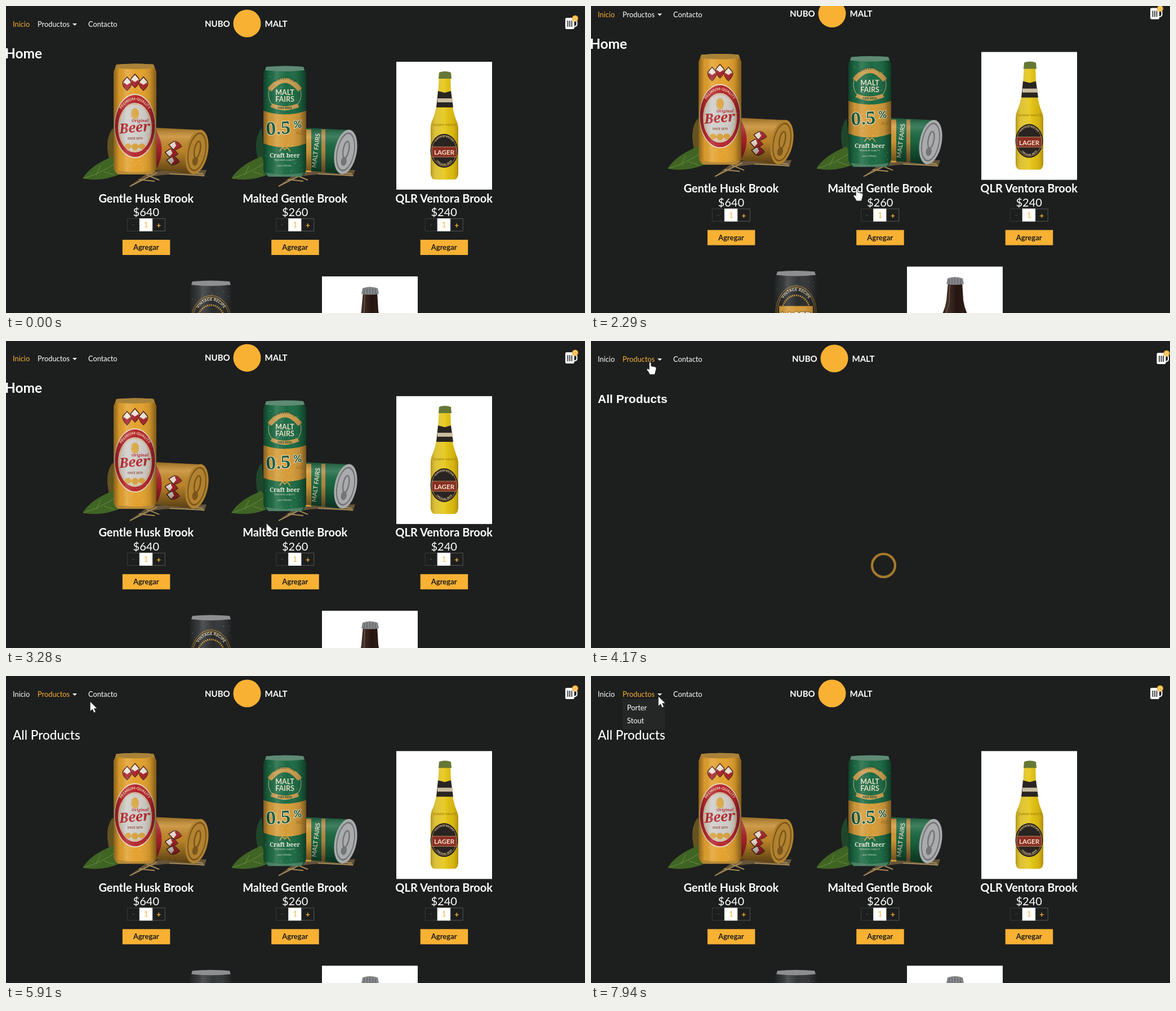
An HTML page that plays this animation: 1028 by 545 pixels, repeating every 8 s.

```html
<!DOCTYPE html>
<html lang="es">
<head>
<meta charset="utf-8">
<title>Tienda</title>
<style>
html, body { margin: 0; width: 100%; height: 100%; overflow: hidden; background: #1d1e1e; }
svg { position: absolute; left: 0; top: 0; }
text { font-family: Lato, sans-serif; fill: #fff; white-space: pre; }
#loader { position: absolute; left: 497px; top: 376px; width: 45px; height: 45px; perspective: 640px; }
#loader div { position: absolute; inset: 0; box-sizing: border-box; border: 4.5px solid #f8b133; border-radius: 50%; opacity: .4; }
</style>
</head>
<body>
<svg id="stage" width="1028" height="545"></svg>
<div id="loader"><div></div><div></div></div>
<svg id="overlay" width="1028" height="545"></svg>
<script>
const AMBER = '#f8b133', GOLD = '#d6a03c', CREAM = '#e9dfc4', SERIF = "font-family:'Noto Serif',serif";
const $ = id => document.getElementById(id);
let arcCount = 0;

const text = (x, y, size, str, extra = '') => `<text x="${x}" y="${y}" font-size="${size}" ${extra}>${str}</text>`;
const mid = (x, y, size, str, extra = '') => text(x, y, size, str, 'text-anchor="middle" ' + extra);
const style = (fill, weight = 700, css = '') => `style="fill:${fill};${css}" font-weight="${weight}"`;
const rect = (x, y, w, h, fill, extra = '') => `<rect x="${x}" y="${y}" width="${w}" height="${h}" fill="${fill}" ${extra}/>`;
const oval = (x, y, rx, ry, fill, extra = '') => `<ellipse cx="${x}" cy="${y}" rx="${rx}" ry="${ry}" fill="${fill}" ${extra}/>`;
const path = (d, fill, extra = '') => `<path d="${d}" fill="${fill}" ${extra}/>`;
const group = (x, y, inner, extra = '') => `<g transform="translate(${x} ${y}) ${extra}">${inner}</g>`;

// Text along the upper (sweep 1) or lower (sweep 0) half of an ellipse
function arcText(x, y, rx, ry, size, str, fill, sweep = 1) {
  const id = 'arc' + arcCount++;
  return path(`M${x - rx} ${y}A${rx} ${ry} 0 0 ${sweep} ${x + rx} ${y}`, 'none', `id="${id}"`) +
    `<text font-size="${size}" text-anchor="middle" ${style(fill)}><textPath href="#${id}" startOffset="50%">${str}</textPath></text>`;
}

function droplets(seed) {
  let out = '';
  for (let i = 0; i < 45; i++) {
    seed = seed * 16807 % 2147483647;
    const x = 4 + seed % 69, y = 14 + (seed >> 8) % 175;
    out += oval(x, y, .5, .9, '#fff', 'opacity=".45"');
  }
  return out;
}

const canShape = 'M5 1Q38-2 71 1L76 14V184Q74 193 67 196H9Q2 193 0 184V14Z';
const can = (color, rim, label, seed) =>
  path(canShape, color) + label + droplets(seed) + path(canShape, 'url(#shade)') +
  path('M5 1Q38-2 71 1L73 7Q38 11 3 7Z', rim) +
  path('M4 189Q38 195 72 189L67 196H9Z', rim, 'opacity=".7"');

const scenery = (color, end, tab, sticker) =>
  path('M190 217Q174 236 184 275L196 285Z', color) + path('M190 217Q174 236 184 275L196 285Z', '#23301899') +
  path('M136 306Q151 282 190 267L204 298Q170 313 136 306Z', '#3f6424') +
  path('M138 306Q170 296 196 278M160 300L168 283M174 294L192 300', 'none', 'stroke="#6b8d3e" stroke-width="1"') +
  path('M218 321L256 293 335 292 356 291 352 303Q300 294 252 304Z', '#65543a') +
  path('M220 320L268 296M236 308l28 3M250 300l22 9M290 298l62 3M310 293l40 5', 'none', 'stroke="#a58a58" stroke-width="2"') +
  path('M262 216L342 220Q362 232 358 260 352 292 330 298L262 291Z', color) +
  sticker +
  path('M262 216L342 220Q362 232 358 260 352 292 330 298L262 291Z', 'url(#shadeDown)') +
  group(339, 259, oval(0, 0, 19.5, 40, end) + oval(0, 0, 16, 35, tab) + oval(0, 0, 14, 32, end) +
    oval(0, -4, 5, 15, 'none', `stroke="${tab}" stroke-width="2.5"`) + oval(0, 17, 5, 8, tab), 'rotate(11)');

const berry = (x, y) =>
  path(`M${x} ${y + 14}Q${x - 10} ${y + 5} ${x - 7} ${y - 2}L${x} ${y - 10} ${x + 7} ${y - 2}Q${x + 10} ${y + 5} ${x} ${y + 14}Z`, '#eee3d5', 'stroke="#4a1b12" stroke-width="1.5"') +
  path(`M${x} ${y + 13}Q${x - 9} ${y + 6} ${x - 6} ${y}L${x} ${y + 4} ${x + 6} ${y}Q${x + 9} ${y + 6} ${x} ${y + 13}Z`, '#a8232a');
const berries = berry(24, 33) + berry(53, 33) + berry(38, 28);

const goldLabel = berries +
  oval(38, 110, 37, 57, '#e9d9c0') + oval(38, 110, 35.5, 55, '#b3262b') +
  oval(38, 113, 30, 44, '#cfccc8') + oval(38, 113, 28, 42, 'none', 'stroke="#d9a94a"') +
  arcText(38, 105, 30, 41, 6.5, 'PREMIUM·QUALITY', '#f5dfb5') +
  oval(38, 88, 7, 10, '#d9a94a') +
  mid(47, 103, 7, 'Original', style('#b3262b', 700, SERIF + ';font-style:italic')) +
  mid(38, 121, 24, 'Beer', style('#b3262b', 700, SERIF + ';font-style:italic') + ' transform="rotate(-5 38 119)"') +
  mid(38, 134, 5, 'SINCE 1870', style('#8b3b2c')) +
  oval(26, 146, 6, 5, GOLD) + oval(38, 147, 6, 6, GOLD) + oval(50, 146, 6, 5, GOLD);

const greenLabel =
  oval(38, 50, 29, 28, 'none', 'stroke="#cfc49d"') +
  path('M11 42Q38 8 65 42', 'none', 'stroke="#c99c4d" stroke-width="9"') +
  arcText(38, 44, 25, 21, 5.5, 'HARVESTTIME', '#17472f') +
  mid(38, 51, 12.5, 'MALT', style(CREAM)) + mid(38, 63, 12.5, 'FAIRS', style(CREAM)) +
  path('M14 69Q38 80 62 69', 'none', 'stroke="#c99c4d" stroke-width="7"') +
  mid(38, 76, 5, 'FREE BEER', style('#17472f')) +
  path('M0 79Q38 92 76 79V137Q38 151 0 137Z', '#d49b38') +
  `<g transform="rotate(-4 38 115)" stroke="#f4ead0" stroke-width="2" paint-order="stroke">` +
  text(5, 120, 31, '0.5', style('#17583a', 700, SERIF)) + text(54, 111, 18, '%', style('#17583a')) + '</g>' +
  text(58, 121, 8, 'ALC', style('#a97720', 400)) +
  path('M29 151q4-10 9-3 5-7 9 3', 'none', 'stroke="#c99c4d" stroke-width="2"') +
  mid(38, 162, 10.5, 'Craft beer', style('#f2eee0', 700, SERIF)) +
  mid(38, 168, 4, 'PREMIUM QUALITY', style('#d5d7bd', 400)) + mid(38, 178, 4, 'ALE STRONG', style('#d5d7bd', 400));

const darkLabel =
  oval(38, 73, 36, 47, 'none', 'stroke="#c08d35"') + oval(38, 73, 33, 44, '#292b2b', 'stroke="#c08d35"') +
  arcText(38, 70, 28, 35, 7, 'VINTAGE RECIPE', CREAM) +
  oval(38, 73, 25, 30, 'none', 'stroke="#c08d35" stroke-width="3" stroke-dasharray="2 1.5"') +
  rect(8, 62, 60, 29, '#d49a36') +
  mid(38, 84, 17, 'LAGER', style('#f4e6c5', 700, 'stroke:#5b4425;stroke-width:1.5;paint-order:stroke')) +
  arcText(38, 77, 32, 39, 6.5, 'ORIGINAL BEER', CREAM, 0);

const goldShot = scenery('#c58a2b', '#b1822f', '#7b551b',
  group(268, 294, berries, 'rotate(-82) scale(.95) translate(0 -8)') + path('M267 222Q286 255 267 289Z', '#a8232a')) +
  group(191, 103, can('#e3a12d', '#a98238', goldLabel, 71));
const greenShot = scenery('#1c6a43', '#a9abac', '#737678',
  rect(268, 219, 10, 76, '#d49b38') + rect(296, 219, 7, 76, '#b78b43') +
  mid(0, 0, 11, 'MALT FAIRS', style(CREAM) + ' transform="translate(290 257) rotate(-83)"')) +
  group(193, 107, can('#1c6a43', '#5f8a74', greenLabel, 907));
const darkShot = scenery('#363839', '#9a9b9b', '#646566', rect(280, 219, 16, 76, '#c08d35')) +
  group(193, 107, can('#343738', '#8d8f90', darkLabel, 3301));

const lagerBottle = rect(693, 99, 170, 227, '#fff') +
  path('M769 124L767 155Q765 185 756 205 754 210 754 220V298Q755 308 762 308H795Q802 308 803 298V220Q803 210 800 205 792 185 790 155L789 124Z', '#dcbc16') +
  path('M769 124L767 155Q765 185 756 205 754 210 754 220V298Q755 308 762 308H795Q802 308 803 298V220Q803 210 800 205 792 185 790 155L789 124Z', 'url(#glass)') +
  path('M769 118Q779 114 790 118L791 129H768Z', '#667735') +
  path('M767 151L779 154 790 151 794 180H764Z', '#292522') + rect(766, 164, 27, 7, '#c9bda0') +
  mid(779, 213, 6, 'SUNNY MALTS', style('#a58608', 700)) +
  oval(778, 257, 24.5, 30, '#292421') + oval(778, 257, 22, 27, 'none', 'stroke="#b08a48"') +
  arcText(778, 255, 19, 22, 4.5, 'VINTAGE RECIPE', '#d8c49c') +
  rect(756, 250, 44, 18, '#8a2f25', 'stroke="#c39b61" stroke-width=".8"') +
  mid(778, 264, 11.5, 'LAGER', style('#f1e3c6')) +
  arcText(778, 260, 19, 23, 4.5, 'ORIGINAL BEER', '#d8c49c', 0);

const brownBottle = rect(561, 480, 170, 227, '#fff') +
  path('M634 507L631 540Q628 562 614 580 609 587 609 600V690H683V600Q683 587 678 580 664 562 661 540L659 507Z', '#25130e') +
  path('M634 507L631 540Q628 562 614 580 609 587 609 600V690H683V600Q683 587 678 580 664 562 661 540L659 507Z', 'url(#shade)') +
  path('M637 512L636 545Q630 568 618 586V640', 'none', 'stroke="#71503f" stroke-width="1.5"') +
  path('M633 501Q646 496 660 501L662 511Q646 514 631 511Z', '#85878a') +
  path('M636 502v9M641 501v10M646 501v10M651 501v10M656 502v9', 'none', 'stroke="#55575a"') +
  oval(646, 623, 29, 29, '#d3ae55') + oval(646, 623, 26, 26, '#35302a') + oval(646, 623, 18, 18, '#d9d0b8') +
  arcText(646, 623, 19.5, 19.5, 5, 'CRAFT BEER', CREAM);

const card = (x, name, price) =>
  mid(x, 348.5, 20, name, 'font-weight="700"') + mid(x, 373, 20, price) +
  rect(x - 33.5, 377.5, 23, 22, 'none', 'stroke="#3a3b3b"') + mid(x - 23, 393, 12.8, '-', style('#505151', 400)) +
  rect(x - 12, 377, 23.5, 23, '#fff') + mid(x, 393, 12.8, '1', style(AMBER, 400)) +
  rect(x + 11.5, 377.5, 22, 22, 'none', 'stroke="#555656"') + mid(x + 22.5, 394, 14, '+', style(AMBER)) +
  rect(x - 42, 415, 84.5, 27, AMBER) + mid(x, 433, 13, 'Agregar', style('#1a1a1a'));

const gradient = (id, dir, stops) => `<linearGradient id="${id}" x2="${dir ? 0 : 1}" y2="${dir}">` +
  stops.map(([at, color, alpha]) => `<stop offset="${at}" stop-color="${color}" stop-opacity="${alpha}"/>`).join('') + '</linearGradient>';

$('stage').innerHTML = '<defs>' +
  gradient('shade', 0, [[0, '#000', .4], [.14, '#000', .05], [.3, '#fff', .14], [.55, '#fff', 0], [.85, '#000', .12], [1, '#000', .45]]) +
  gradient('shadeDown', 1, [[0, '#000', .25], [.2, '#fff', .15], [.5, '#000', .05], [1, '#000', .55]]) +
  gradient('glass', 0, [[0, '#8b6a00', .5], [.25, '#fff', .12], [.5, '#ffe93c', .35], [.8, '#c79e00', .2], [1, '#7d5e00', .5]]) +
  '</defs><g id="page"><g id="products">' +
  goldShot + group(264, 0, greenShot) + lagerBottle + group(133, 381, darkShot) + brownBottle +
  card(248.8, 'Gentle Husk Brook', '$640') + card(513.2, 'Malted Gentle Brook', '$260') + card(777.7, 'QLR Ventora Brook', '$240') +
  '</g><g id="home">' + text(-2, 93, 24.5, 'Home', 'font-weight="700"') + '</g>' +
  text(12, 110, 21, 'All Products', `id="rawTitle" font-weight="700" style="font-family:'Liberation Sans',sans-serif"`) +
  text(12, 112.5, 22.5, 'All Products', 'id="title" font-weight="500"') +
  text(12, 37, 12.8, 'Inicio', 'id="navHome"') + text(56, 37, 12.8, 'Productos', 'id="navProducts"') +
  path('M118 31H126L122 35Z', '#fff') + text(146, 37, 12.8, 'Contacto') +
  '<g id="brand">' + text(353, 36.5, 15, 'NUBO', 'font-weight="700"') + oval(428, 31, 24.5, 24.5, AMBER) +
  text(459.5, 36.5, 15, 'MALT', 'font-weight="700"') + '</g><g id="cart">' +
  rect(993, 21, 16, 20, '#fff', 'rx="2.5"') +
  path('M1008 26.5H1012Q1013.5 26.5 1013.5 28V33Q1013.5 35 1011 36L1008 37', 'none', 'stroke="#fff" stroke-width="2"') +
  path('M997.5 26V37M1001 26V37M1004.5 26V37', 'none', 'stroke="#1d1e1e" stroke-width="1.6"') +
  oval(1010.5, 22, 5.5, 5.5, AMBER) + mid(1010.5, 25.5, 9.5, '0') + '</g>' +
  '<g id="menu">' + rect(56, 41, 75.5, 54, '#252626') + text(64, 61, 12.8, 'Porter') + text(64, 84, 12.8, 'Stout') + '</g></g>';

$('overlay').innerHTML = '<g id="cursor" fill="#fff" stroke="#222" stroke-width=".7">' +
  '<path id="arrow" d="M0 0V17.5L4 13.8 6.8 20 9.8 18.7 7 12.6H12.5Z"/>' +
  '<path id="hand" d="M-1.7 1.5Q0-1.5 1.7 1.5V7L9 8.6Q11 9.2 10.8 11.5L9.5 17 8 22H-.5Q-3 17-6 13.5-5.5 10.5-3 12L-1.7 13.2Z"/></g>';

// Pointer stops: time, x, y
const route = [
  [390, 735, 530], [600, 361, 402], [1070, 361, 402], [1450, 410, 382], [1870, 465, 337], [2200, 472, 324], [2470, 472, 324],
  [2820, 464, 325], [3280, 463, 324], [3560, 270, 160], [3820, 101, 18], [3900, 103, 25], [4030, 104, 31], [4170, 105, 37.5],
  [4900, 112, 37.5], [5500, 133, 42], [5910, 149.5, 45], [6150, 128, 78], [6450, 162, 34], [6640, 162, 34],
  [7050, 125, 40], [7390, 98, 26], [7600, 108, 19], [7940, 119.5, 36]
];
const handTimes = [[1930, 2800], [3720, 5150], [7150, 7850]];
const within = (t, a, b) => t >= a && t < b;
const easeInOut = p => (1 - Math.cos(Math.PI * Math.min(1, Math.max(0, p)))) / 2;

function pointer(t) {
  const i = route.findIndex(stop => stop[0] > t);
  if (i < 0) return route[route.length - 1].slice(1);
  const [t0, x0, y0] = route[i - 1], [t1, x1, y1] = route[i], p = (t - t0) / (t1 - t0);
  return [x0 + (x1 - x0) * p, y0 + (y1 - y0) * p];
}
const show = (id, on) => $(id).style.display = on ? '' : 'none';
const move = (id, x, y) => $(id).setAttribute('transform', `translate(${x} ${y})`);

function draw(t) {
  const home = t < 4150, loading = within(t, 4150, 5400);
  const scroll = 78.7 * (easeInOut((t - 2210) / 260) - easeInOut((t - 3050) / 250));
  move('page', 0, -scroll);
  move('products', 0, home ? 0 : 34.3);
  move('brand', loading ? 4 : 0, 0);
  move('cart', loading ? 11.5 : 0, 0);
  show('products', !loading);
  show('home', home);
  show('rawTitle', within(t, 4150, 4300));
  show('title', t >= 4300);
  show('menu', t >= 7600);
  $('navHome').style.fill = home ? AMBER : '#fff';
  $('navProducts').style.fill = home ? '#fff' : AMBER;

  show('loader', loading);
  const turn = (t - 4150) / 2000, [ringA, ringB] = $('loader').children;
  const spin = (x, y) => `rotateX(${x * turn}deg) rotateY(${y * turn}deg) rotateZ(${360 * turn}deg)`;
  ringA.style.transform = spin(180, 360);
  ringB.style.transform = spin(360, 180);

  show('cursor', t >= 390);
  if (t >= 390) move('cursor', ...pointer(t));
  const hand = handTimes.some(([a, b]) => within(t, a, b));
  show('hand', hand);
  show('arrow', !hand);
}

const start = performance.now();
(function tick() {
  draw((performance.now() - start) % 8000);
  requestAnimationFrame(tick);
})();
</script>
</body>
</html>
```
